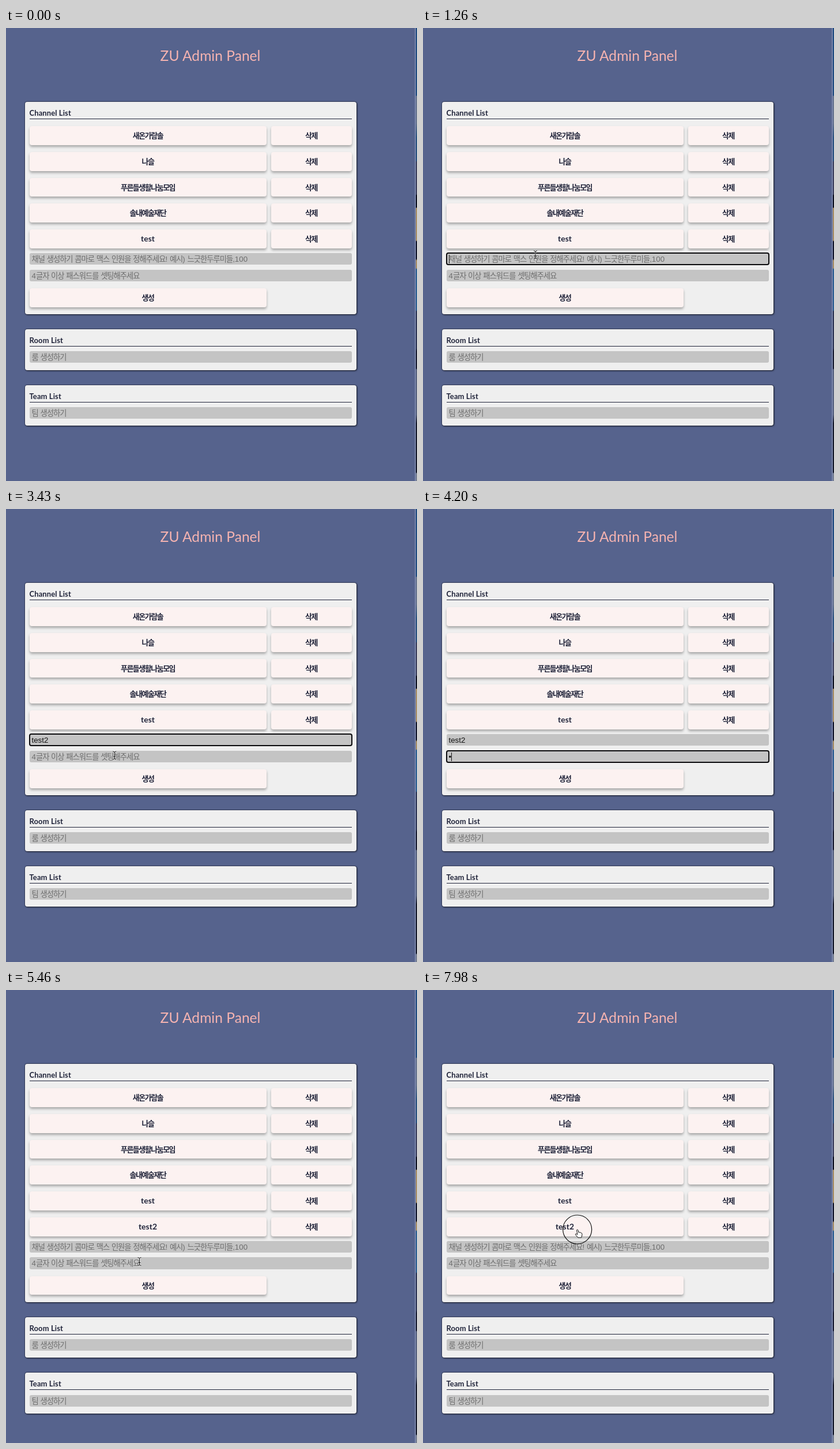
Write an HTML page that moves like this. It is 713 px wide and 785 px high and loops after 8000 ms.

```html
<!DOCTYPE html>
<html lang="ko">
<head>
<meta charset="utf-8">
<title>Admin Panel</title>
<style>
html, body { margin: 0; width: 100%; height: 100%; overflow: hidden; }
body {
  position: relative; background: #56638d; color: #20243a;
  font: bold 14px Lato, "Noto Sans CJK KR", sans-serif;
}
h1 {
  position: absolute; left: 0; top: 31px; width: 709px; margin: 0;
  font: 24.6px/34px Lato, sans-serif; text-align: center; color: #f5b3b0;
}
#panels { position: absolute; left: 32.5px; top: 128px; width: 575px; }
.panel {
  box-sizing: border-box; margin-bottom: 26px; padding: 0 8px 12.25px;
  background: #efefef; border-radius: 4px;
  box-shadow: 0 0 1px 1px rgba(20, 24, 42, .45), 1px 1px 3px rgba(0, 0, 0, .7);
}
h2 {
  height: 29px; margin: 0; border-bottom: 1px solid #20243a;
  font-size: 13px; line-height: 38px; letter-spacing: .1px;
}
.row { display: flex; gap: 8px; height: 32.75px; padding-top: 12px; }
.row[hidden] { display: none; }
.btn {
  width: 411px; border-radius: 4px; background: #fcf2f1;
  line-height: 32px; text-align: center;
  box-shadow: 0 3px 4px rgba(0, 0, 0, .3);
}
.btn + .btn { width: 140px; }
.btn s { font-size: 13px; letter-spacing: -1.5px; }
.in {
  height: 20.25px; margin-top: 8.25px; padding-left: 4px; border-radius: 3px;
  background: #c4c4c4; color: #111; white-space: nowrap; overflow: hidden;
  font: 13.33px/21px "Liberation Sans", "Noto Sans CJK KR", sans-serif;
}
.in.focus { outline: 2px solid #0c0c0e; outline-offset: -1px; }
.in em { font-style: normal; color: #6e6e6e; }
.in s { letter-spacing: -1.03px; }
.in i {
  display: inline-block; width: 1px; height: 15px; margin-right: -1px;
  vertical-align: -3px; background: #111;
}
s { text-decoration: none; }
#edge {
  position: absolute; right: 0; top: 0; width: 2px; height: 100%;
  border-left: 2px solid #7682a8;
  background: linear-gradient(#1d4a80 0 117px, #68758f 118px 165px, #27507f 190px 230px,
    #3b3f5c 232px 288px, #0d1020 290px 311px, #a98f66 312px 368px, #11152a 370px 400px,
    #a98f66 403px 416px, #2b5f92 418px 489px, #2c3454 491px 555px, #171b30 560px 590px,
    #57627f 592px 670px, #141829 685px 770px, #777f92 772px);
}
svg { position: absolute; inset: 0; width: 100%; height: 100%; pointer-events: none; }
</style>
</head>
<body>
<h1>ZU Admin Panel</h1>
<div id="panels"></div>
<div id="edge"></div>
<svg>
  <g id="cursor">
    <path id="arrow" d="M0 0V14L3.2 11 5.4 16 7.6 15 5.5 10.3H10Z" fill="#000" stroke="#fff" stroke-width=".8"/>
    <path id="hand" d="M-1.2 1Q0-.8 1.2 1L2.1 5Q3.5 4 4.3 5.3 5.8 4.6 6.5 6 8 5.8 8.2 7.5V10L7 14H1.2L-3 9.3Q-3.8 7.4-2.2 7.4L.2 8.9Z" fill="#fff" stroke="#111"/>
    <g id="beam" fill="none">
      <path d="M-3-7Q0-7 0-5V5Q0 7-3 7M3-7Q0-7 0-5M0 5Q0 7 3 7M-2 2H2" stroke="#fff" stroke-width="2.4" stroke-opacity=".6"/>
      <path d="M-3-7Q0-7 0-5V5Q0 7-3 7M3-7Q0-7 0-5M0 5Q0 7 3 7M-2 2H2" stroke="#111"/>
    </g>
    <circle id="ring" r="25" fill="none" stroke="#111" stroke-width="1.2"/>
  </g>
</svg>
<script>
const LOOP = 8000, STEP = 70;
const $ = id => document.getElementById(id);
const hangul = text => text.replace(/[가-힣]+/g, '<s>$&</s>');
const btn = text => `<div class="btn">${hangul(text)}</div>`;
const row = (...texts) => `<div class="row">${texts.map(btn).join('')}</div>`;
const field = id => `<div class="in" id="${id}"></div>`;
const panel = (title, body) => `<div class="panel"><h2>${title}</h2>${body}</div>`;

const channels = ['새온가람솔', '나슬', '푸른들생활나눔모임', '솔내예술재단', 'test', 'test2'];
const hints = {
  channel: '채널 생성하기 콤마로 맥스 인원을 정해주세요! 예시) 느긋한두루미들,100',
  pass: '4글자 이상 패스워드를 셋팅해주세요',
  room: '룸 생성하기',
  team: '팀 생성하기'
};
$('panels').innerHTML =
  panel('Channel List', channels.map(c => row(c, '삭제')).join('') +
    field('channel') + field('pass') + row('생성')) +
  panel('Room List', field('room')) +
  panel('Team List', field('team'));
const newRow = document.querySelectorAll('.row')[5];

const CREATED = 5460;
const keys = { channel: [2100, 2170, 2450, 2590, 2800], pass: [4200, 4270, 4340, 4480] };
const values = { channel: 'test2', pass: '••••' };
const focus = [[420, 'room'], [1050, 'channel'], [3780, 'pass'], [5180, '']];
const caretOff = [[1680, 2100], [3220, 3780], [4130, 4200]];
const clicks = [[420, 560], [1050, 1190], [3780, 3850], [5180, 5390], [7910, LOOP]];
const hidden = [[0, 70], [2100, 3220], [4130, 4550]];
const path = [
  [70, 704, 690], [420, 300, 738], [490, 300, 738], [910, 190, 410.4], [1050, 196, 403],
  [1190, 195, 403], [1260, 195, 393], [3150, 199, 384], [3500, 187, 432], [3570, 187, 432],
  [3640, 186, 432], [4480, 186, 432], [4760, 231.5, 470.5], [6020, 231.5, 470.5],
  [6230, 226, 529], [6370, 226, 529], [6650, 224, 576], [6720, 224, 576],
  [7070, 208, 612], [7140, 208, 612], [7840, 267.7, 415], [LOOP, 267.7, 415]
];
const within = (spans, t) => spans.some(([a, b]) => t >= a && t < b);

function pointer(t) {
  const n = path.findIndex(p => p[0] > t);
  if (n < 1) return path[0].slice(1);
  const [a, x, y] = path[n - 1], [b, u, v] = path[n];
  const k = (t - a) / (b - a), e = k * k * (3 - 2 * k);
  return [x + (u - x) * e, y + (v - y) * e];
}

function drawField(id, t, active) {
  const typed = t < CREATED && keys[id] ? keys[id].filter(k => k <= t).length : 0;
  const caret = active && id !== 'room' && !within(caretOff, t) ? '<i></i>' : '';
  $(id).classList.toggle('focus', active);
  $(id).innerHTML = typed
    ? values[id].slice(0, typed) + caret
    : caret + `<em>${hangul(hints[id])}</em>`;
}

function drawCursor(t) {
  const [x, y] = pointer(t);
  const under = document.elementFromPoint(x, y);
  const kind = under?.closest('.btn') ? 'hand' : under?.closest('.in') ? 'beam' : 'arrow';
  for (const id of ['arrow', 'hand', 'beam'])
    $(id).style.display = id === kind ? '' : 'none';
  $('ring').style.display = within(clicks, t) ? '' : 'none';
  $('cursor').style.display = within(hidden, t) ? 'none' : '';
  $('cursor').setAttribute('transform', `translate(${x} ${y})`);
}

function draw(t) {
  newRow.hidden = t < CREATED;
  const active = focus.filter(f => f[0] <= t).pop()?.[1];
  for (const id in hints) drawField(id, t, id === active);
  drawCursor(t);
}

let last = -1;
function tick() {
  const t = Math.floor(performance.now() % LOOP / STEP) * STEP;
  if (t !== last) draw(last = t);
  requestAnimationFrame(tick);
}
tick();
</script>
</body>
</html>
```
